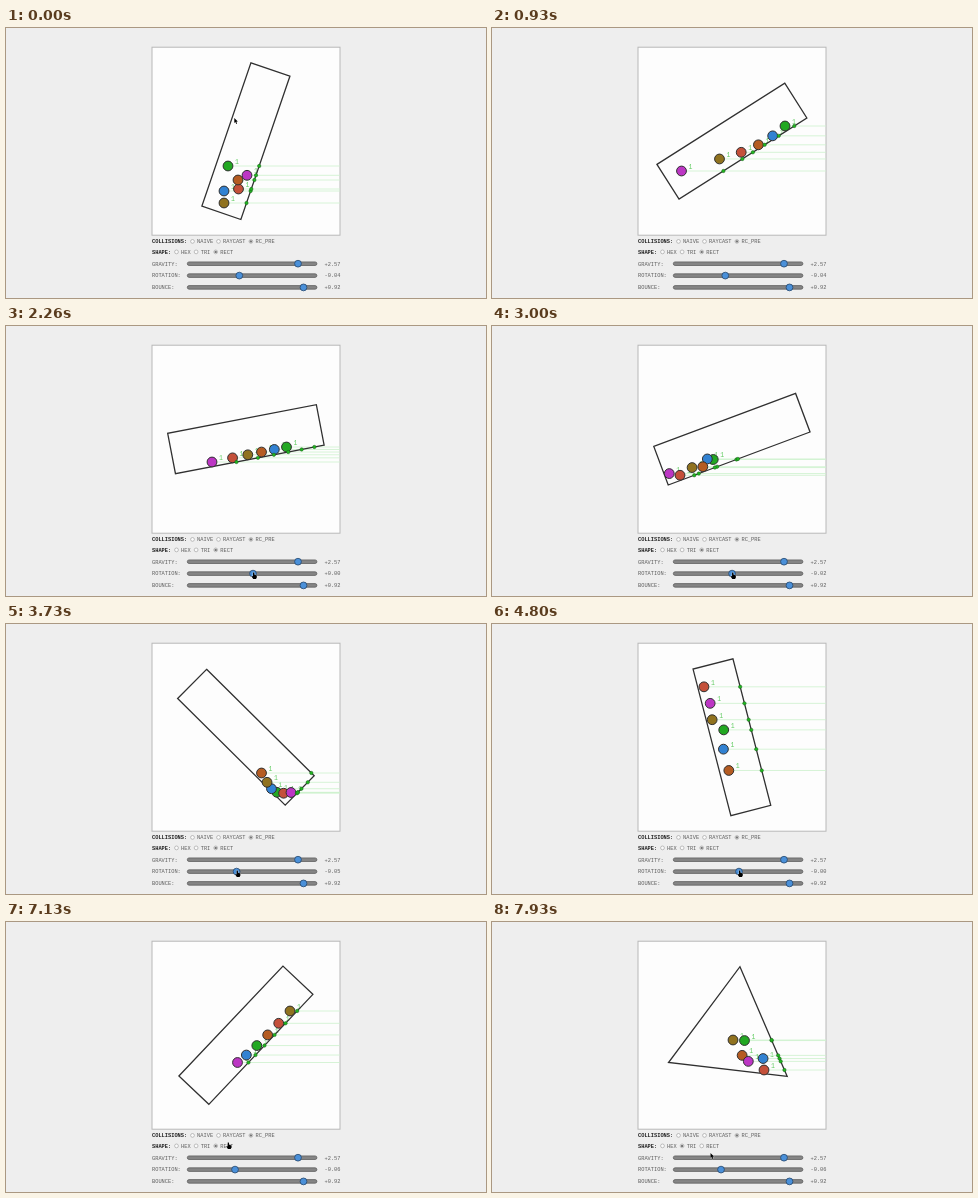
Animation of 480 by 270 pixels, one loop 8 s. Source, as an HTML page with a canvas:

```html
<!DOCTYPE html>
<html lang="en">
<head>
<meta charset="utf-8">
<title>Balls in a rotating shape</title>
<style>
  html, body { margin: 0; width: 100%; height: 100%; overflow: hidden; background: #eee; }
  canvas { display: block; width: 480px; height: 270px; }
</style>
</head>
<body>
<canvas id="stage"></canvas>
<script>
const canvas = document.getElementById('stage');
const ctx = canvas.getContext('2d');
const scale = window.devicePixelRatio || 1;
canvas.width = 480 * scale;
canvas.height = 270 * scale;

const LOOP = 8000, FRAMES = 120, STEP = LOOP / FRAMES;
const CX = 239.9, CY = 113.2, RADIUS = 5, RIGHT = 334;
const HALF_LONG = 75.7, HALF_SHORT = 20.6, TRI_RADIUS = 69;
const TRI_AT = 7500, GRAB = 1530, RELEASE = 6920;
const DEG = Math.PI / 180;
const INK = '#303030';
const BALLS = {
  green: '#22a822', blue: '#3282d2', red: '#c4503a',
  brown: '#b55c22', purple: '#bc36c4', olive: '#90721f'
};
const NAMES = Object.keys(BALLS);

// Rotation slider in radians per 1/60 s: ramps from one value to the next
const FIRST_SPIN = -0.0442;
const RAMPS = [
  { from: 1700, to: 2246, value: 0 },
  { from: 2750, to: 3342, value: -0.0529 },
  { from: 4300, to: 5400, value: 0.06335 },
  { from: 5500, to: 5700, value: 0.028 },
  { from: 6000, to: 6919, value: -0.058 }
];

// The balls lie in rows: `ease` sets the spacing, `bow` and `waves` the bend
const ROWS = [
  { frame: 14, order: 'purple olive red brown blue green', a: [189.5, 143], b: [293, 98], ease: 0.65, bow: 7 },
  { frame: 34, order: 'purple red olive brown blue green', a: [206, 136], b: [280.5, 121], ease: 0.8 },
  { frame: 56, order: 'brown olive blue green red purple', a: [255.5, 149], b: [285, 168.5], ease: 0.8, bow: 8 },
  { frame: 87, order: 'green blue brown purple red olive', a: [182.5, 105], b: [279, 137], ease: 0.8, bow: 4.5 },
  { frame: 107, order: 'purple blue green brown red olive', a: [231.5, 140.5], b: [284, 89], ease: 1.15, bow: 1.5 },
  { frame: 119, order: 'olive green brown purple blue red', a: [241, 118], b: [272, 148], bow: -8, waves: 3 }
];
const START = {
  green: [222, 138], blue: [218, 163], red: [232.5, 161],
  brown: [232, 152], purple: [241, 147.3], olive: [218, 175]
};

const frameTime = i => Math.floor(i * STEP / 10 + 1e-6) * 10;
const lerp = (a, b, s) => a + (b - a) * s;
const progress = (t, from, to) => Math.min(1, Math.max(0, (t - from) / (to - from)));

function spin(t) {
  return RAMPS.reduce((v, r) => lerp(v, r.value, progress(t, r.from, r.to)), FIRST_SPIN);
}

// Exact integral of the spin
function angle(t) {
  let sum = FIRST_SPIN * t, value = FIRST_SPIN;
  for (const r of RAMPS) {
    const s = progress(t, r.from, r.to);
    sum += (r.value - value) * ((r.to - r.from) * s * s / 2 + Math.max(0, t - r.to));
    value = r.value;
  }
  return -71.1 * DEG + sum * 0.06;
}

function turn(p, a) {
  const c = Math.cos(a), s = Math.sin(a);
  return { x: p.x * c - p.y * s, y: p.x * s + p.y * c };
}

// Corners relative to the centre, clockwise
function corners(t) {
  const a = angle(t);
  if (t >= TRI_AT) {
    return [0, 120, 240].map(d => turn({ x: TRI_RADIUS, y: 0 }, a + (62.8 + d) * DEG));
  }
  return [[1, 1], [-1, 1], [-1, -1], [1, -1]]
    .map(([x, y]) => turn({ x: x * HALF_LONG, y: y * HALF_SHORT }, a));
}

// Keep a ball inside the walls; bounce it when a wall speed is given
function confine(p, walls, margin, omega) {
  walls.forEach((a, k) => {
    const b = walls[(k + 1) % walls.length];
    const len = Math.hypot(b.x - a.x, b.y - a.y);
    const nx = (a.y - b.y) / len, ny = (b.x - a.x) / len;
    const depth = margin - (p.x - a.x) * nx - (p.y - a.y) * ny;
    if (depth <= 0) return;
    p.x += nx * depth;
    p.y += ny * depth;
    if (omega === undefined) return;
    const speed = (p.vx + omega * p.y) * nx + (p.vy - omega * p.x) * ny;
    if (speed < 0) {
      p.vx -= 1.45 * speed * nx;
      p.vy -= 1.45 * speed * ny;
    }
  });
}

function collide(p, q) {
  const dx = q.x - p.x, dy = q.y - p.y, d = Math.hypot(dx, dy) || 1;
  const push = (2 * RADIUS - d) / 2;
  if (push <= 0) return;
  const nx = dx / d, ny = dy / d;
  p.x -= nx * push; p.y -= ny * push;
  q.x += nx * push; q.y += ny * push;
  const speed = (q.vx - p.vx) * nx + (q.vy - p.vy) * ny;
  if (speed < 0) {
    const j = speed * 0.75;
    p.vx += j * nx; p.vy += j * ny;
    q.vx -= j * nx; q.vy -= j * ny;
  }
}

function advance(balls, frame) {
  const SUB = 8, dt = STEP / 1000 / SUB, gravity = 900;
  for (let s = 1; s <= SUB; s++) {
    const t = (frame + s / SUB) * STEP;
    const walls = corners(t), omega = spin(t) * 60;
    for (const b of balls) {
      b.vy += gravity * dt;
      b.x += b.vx * dt;
      b.y += b.vy * dt;
    }
    balls.forEach((p, i) => balls.slice(i + 1).forEach(q => collide(p, q)));
    balls.forEach(b => confine(b, walls, RADIUS, omega));
  }
}

function layRow({ order, a, b, ease = 1, bow = 0, waves = 1 }) {
  const row = order.split(' ');
  const len = Math.hypot(b[0] - a[0], b[1] - a[1]);
  return NAMES.map(name => {
    const s = row.indexOf(name) / (row.length - 1), along = s ** ease;
    const bend = bow * Math.sin(waves * Math.PI * s) / len;
    return {
      x: lerp(a[0], b[0], along) - (b[1] - a[1]) * bend - CX,
      y: lerp(a[1], b[1], along) + (b[0] - a[0]) * bend - CY
    };
  });
}

// Simulate from row to row and steer each run into the next row
function buildTrack() {
  const track = [];
  const balls = NAMES.map(() => ({ vx: 0, vy: 0 }));
  const start = NAMES.map(n => ({ x: START[n][0] - CX, y: START[n][1] - CY }));
  const poses = [{ frame: 0, spots: start }, ...ROWS.map(r => ({ frame: r.frame, spots: layRow(r) }))];
  poses.forEach((pose, k) => {
    const next = poses[k + 1], first = pose.frame, last = next ? next.frame : FRAMES;
    pose.spots.forEach((p, i) => Object.assign(balls[i], p));
    const run = [];
    for (let f = first; f <= last; f++) {
      run.push(balls.map(b => turn(b, -angle(frameTime(f)))));
      if (f < last) advance(balls, f);
    }
    const end = run[run.length - 1];
    const goal = next ? next.spots.map(p => turn(p, -angle(frameTime(last)))) : end;
    for (let f = first; f < last; f++) {
      const s = (f - first) / (last - first), t = frameTime(f);
      const margin = RADIUS * Math.min(1, 6 * s, 6 * (1 - s));
      track[f] = run[f - first].map((p, i) => {
        const q = turn({
          x: p.x + (goal[i].x - end[i].x) * s * s,
          y: p.y + (goal[i].y - end[i].y) * s * s
        }, angle(t));
        if (margin > 0) confine(q, corners(t), margin);
        return { x: q.x + CX, y: q.y + CY };
      });
    }
  });
  return track;
}

function disc(x, y, r, fill, stroke, width) {
  ctx.beginPath();
  ctx.arc(x, y, r, 0, 2 * Math.PI);
  ctx.fillStyle = fill;
  ctx.fill();
  if (stroke) {
    ctx.strokeStyle = stroke;
    ctx.lineWidth = width;
    ctx.stroke();
  }
}

function text(str, x, y, color = '#5c5c5c', weight = 'normal', size = 5.33) {
  ctx.font = `${weight} ${size}px "Liberation Mono", monospace`;
  ctx.fillStyle = color;
  ctx.fillText(str, x, y);
}

function path(points) {
  ctx.beginPath();
  points.forEach(([x, y]) => ctx.lineTo(x, y));
  ctx.closePath();
}

function rayHits(ball, walls) {
  const hits = [];
  walls.forEach((a, k) => {
    const b = walls[(k + 1) % walls.length];
    if ((a[1] > ball.y) === (b[1] > ball.y)) return;
    const x = lerp(a[0], b[0], (ball.y - a[1]) / (b[1] - a[1]));
    if (x > ball.x) hits.push(x);
  });
  return hits;
}

function drawScene(t, balls) {
  ctx.fillStyle = '#fdfdfd';
  ctx.fillRect(146, 19.2, 188, 188);
  ctx.strokeStyle = '#b8b8b8';
  ctx.lineWidth = 1;
  ctx.strokeRect(146, 19.2, 188, 188);

  const walls = corners(t).map(p => [p.x + CX, p.y + CY]);
  const rays = balls.map(b => rayHits(b, walls));
  balls.forEach((b, i) => {
    ctx.strokeStyle = '#cdf2cd';
    ctx.lineWidth = 0.8;
    ctx.beginPath();
    ctx.moveTo(b.x, b.y);
    ctx.lineTo(RIGHT, b.y);
    ctx.stroke();
    text(rays[i].length, b.x + 7, b.y - 2, '#62cc62', 'normal', 6.5);
  });
  path(walls);
  ctx.strokeStyle = INK;
  ctx.lineWidth = 1.3;
  ctx.stroke();
  balls.forEach((b, i) => disc(b.x, b.y, 4.9, BALLS[NAMES[i]], INK, 1));
  balls.forEach((b, i) => rays[i].forEach(x =>
    disc(x, b.y, 1.7, rays[i].length % 2 ? '#1fb61f' : '#e02a1a', '#1d5a1d', 0.5)));
}

function drawRadios(title, y, options, chosen) {
  text(title, 146, y + 1.8, '#222', 'bold');
  let x = 146 + title.length * 3.2 + 5.3;
  for (const name of options) {
    disc(x, y, 1.9, '#fafafa', '#999', 0.6);
    if (name === chosen) disc(x, y, 1.2, '#777');
    text(name, x + 4.6, y + 1.8);
    x += 10 + name.length * 3.2;
  }
}

function drawSlider(title, y, knob, value) {
  text(title, 146, y + 1.8);
  ctx.beginPath();
  ctx.roundRect(181.3, y - 1.8, 129.6, 3.6, 1.8);
  ctx.fillStyle = '#858585';
  ctx.fill();
  ctx.strokeStyle = '#555';
  ctx.lineWidth = 0.7;
  ctx.stroke();
  disc(knob, y, 3.4, '#4a90d9', '#27486c', 0.8);
  text((value < 0 ? '-' : '+') + Math.abs(value).toFixed(2), 318.5, y + 1.8);
}

// Leave the stage, come back for the slider, then pick the triangle
function mouseAt(t, knob) {
  const glide = (from, to, a, b) => {
    const s = progress(t, from, to);
    return [lerp(a[0], b[0], s), lerp(a[1], b[1], s)];
  };
  if (t < 1400) return glide(250, 780, [228.3, 90], [490, 285]);
  if (t < GRAB) return glide(1400, GRAB, [262, 251], [234, 247]);
  if (t < RELEASE) return [knob + 0.6, 246.5];
  if (t < 7130) return glide(RELEASE, 7130, [229.6, 246.5], [222.3, 220.5]);
  if (t < TRI_AT) return glide(7130, 7350, [222.3, 220.5], [191, 222]);
  return glide(TRI_AT, 7930, [191, 222], [218.5, 231]);
}

function drawMouse(t, knob) {
  ctx.save();
  ctx.translate(...mouseAt(t, knob));
  if (t >= GRAB && t < 7650) {
    path([[-.6, 0], [.6, 0], [.9, 2.3], [3.2, 3], [3.2, 5], [2.4, 6.6], [-.4, 6.6], [-2, 4], [-1.4, 3.4], [-.6, 4]]);
  } else {
    path([[0, 0], [0, 5], [1.1, 4], [1.9, 5.9], [2.8, 5.5], [2, 3.7], [3.5, 3.6]]);
  }
  ctx.strokeStyle = 'rgba(255,255,255,.6)';
  ctx.lineWidth = 0.8;
  ctx.stroke();
  ctx.fillStyle = '#000';
  ctx.fill();
  ctx.restore();
}

const track = buildTrack();

function render(frame) {
  const t = frameTime(frame), v = spin(t), knob = 247 + v * 310;
  ctx.setTransform(scale, 0, 0, scale, 0, 0);
  ctx.fillStyle = '#eee';
  ctx.fillRect(0, 0, 480, 270);
  drawScene(t, track[frame]);
  drawRadios('COLLISIONS:', 213.4, ['NAIVE', 'RAYCAST', 'RC_PRE'], 'RC_PRE');
  drawRadios('SHAPE:', 223.9, ['HEX', 'TRI', 'RECT'], t >= TRI_AT ? 'TRI' : 'RECT');
  drawSlider('GRAVITY:', 235.7, 292, 2.57);
  drawSlider('ROTATION:', 247.6, knob, v);
  drawSlider('BOUNCE:', 259.4, 297.5, 0.92);
  drawMouse(t, knob);
}

const begin = performance.now();
function tick() {
  const t = (performance.now() - begin) % LOOP;
  render(Math.floor((t + 7) / STEP) % FRAMES);
  requestAnimationFrame(tick);
}
tick();
</script>
</body>
</html>
```
